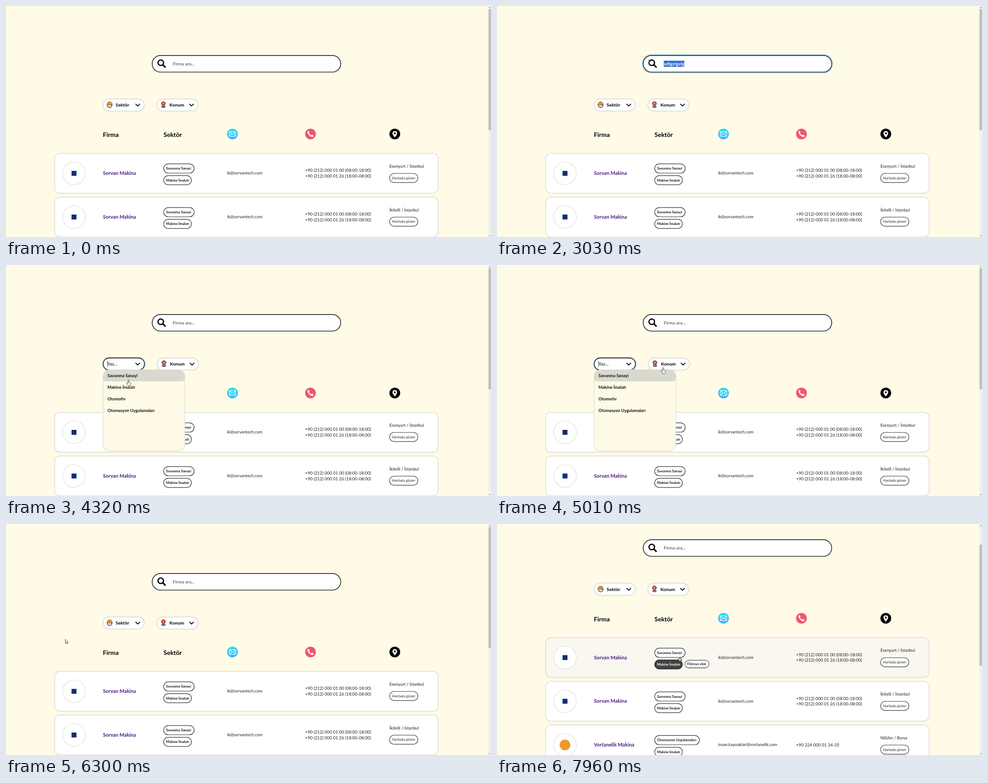
Recreate the animation shown at these times as an HTML page. Size 1084 by 517 pixels, loop 8000 ms.

```html
<!DOCTYPE html>
<html lang="tr">
<head>
<meta charset="utf-8">
<title>Firma listesi</title>
<style>
  html, body { margin: 0; width: 100%; height: 100%; overflow: hidden; background: #fffbe6; }
  svg { display: block; width: 100vw; height: 100vh; font-family: Lato, "Open Sans", sans-serif; }
  .b { font-weight: 700; }
</style>
</head>
<body>
<svg id="stage" viewBox="0 0 1084 517"></svg>
<script>
const LOOP = 8000;
const SCROLL = 75.5;
const stage = document.getElementById('stage');
const $ = id => document.getElementById(id);

// ---- markup helpers ----
const text = (x, y, size, str, extra = '') =>
  `<text x="${x}" y="${y}" font-size="${size}" ${extra}>${str}</text>`;
const bold = (x, y, size, str, extra = '') => text(x, y, size, str, 'class="b" ' + extra);
const box = (x, y, w, h, r, extra) =>
  `<rect x="${x}" y="${y}" width="${w}" height="${h}" rx="${r}" ${extra}/>`;
const chevron = x =>
  `<path d="M${x} 219.6l4.4 4.3 4.4-4.3" fill="none" stroke="#000" stroke-width="2" stroke-linecap="round" stroke-linejoin="round"/>`;

const chip = (y, w, label, id = '') =>
  box(352.4, y, w, 20.6, 10.3, `fill="#fff" stroke="#2b2b2b" stroke-width="1.2" ${id && `id="${id}"`}`) +
  bold(357.8, y + 13, 7.8, label, `fill="#111" ${id && `id="${id}Text"`}`);

const tip = (id, x, y) => `<g id="${id}" opacity="0">
  ${box(x, y + 1.2, 53.5, 17, 8.5, 'fill="#000" opacity=".25"')}
  ${box(x, y, 53.5, 17, 8.5, 'fill="#fff" stroke="#444" stroke-width="1.1"')}
  ${bold(x + 5, y + 11.2, 7.8, 'Filtreye ekle', 'fill="#222"')}</g>`;

function card(i, c) {
  const phones = c.phones.map((p, k) =>
    text(668.6, (c.phones.length > 1 ? 41.7 : 48) + k * 12.4, 9.57, p)).join('');
  return `<g transform="translate(0 ${329.7 + i * 97.75})" fill="#222">
    ${box(108.6, 0, 857.3, 89.4, 12, `id="card${i}" fill="#fff" stroke="#dadad4" stroke-width="1.5"`)}
    <circle cx="152" cy="44.8" r="25.4" fill="#fff" stroke="#e2e2e2" stroke-width="1.4"/>
    ${c.logo}
    ${bold(216.8, 48.4, 11.1, c.name, 'fill="#461a80"')}
    ${chip(23.7, c.w, c.sector, i ? '' : 'chipA')}${chip(49.9, 62, 'Makine İmalatı', i ? '' : 'chipB')}
    ${text(494, 47.7, 9.3, c.mail)}${phones}
    ${text(857, 32.3, 9.3, c.place)}
    ${box(857.4, 45, 63.2, 20.4, 10.2, 'fill="#fff" stroke="#333" stroke-width="1.1"')}
    ${text(862.8, 57.9, 7.7, 'Haritada göster')}</g>`;
}

const blueLogo = '<rect x="146.5" y="39.3" width="11" height="11" fill="#0d2f70"/>';
const sorvan = place => ({
  name: 'Sorvan Makina', logo: blueLogo, w: 68.2, sector: 'Savunma Sanayi', mail: 'ik@sorvantech.com',
  phones: ['+90 (212) 000 01 00 (08:00-18:00)', '+90 (212) 000 01 26 (18:00-08:00)'], place
});
const cards = [
  sorvan('Esenyurt / İstanbul'),
  sorvan('İkitelli / İstanbul'),
  { name: 'Vortanelik Makina', logo: '<circle cx="152" cy="44.8" r="12" fill="#ee9a2e"/>', w: 100,
    sector: 'Otomasyon Uygulamaları', mail: 'insan.kaynaklari@vortanelik.com',
    phones: ['+90 224 000 01 34-35'], place: 'Nilüfer / Bursa' }
];

const helmet = `
  <circle cx="231.5" cy="222.2" r="5" fill="#fff" stroke="#3b3b3b" stroke-width="2.2" stroke-dasharray="2.2 1"/>
  <circle cx="231.5" cy="222.6" r="3.2" fill="#fbe3c4"/>
  <path d="M225.6 221.3v-1.2q.6-5.2 5.9-5.6 5.300.4 5.900 5.600v1.200z" fill="#f6a32b" stroke="#3b3b3b" stroke-width=".9"/>
  <path d="M230.400 214.800h2.200v4h-2.200z" fill="#ffd262" stroke="#3b3b3b" stroke-width=".5"/>`;
const pin = `
  <ellipse cx="351.800" cy="225.600" rx="4.600" ry="1.900" fill="#8b8f96" stroke="#333" stroke-width=".9"/>
  <path d="M351.800 225.300q-4.700-5-4.700-6.900a4.700 4.300 0 0 1 9.400 0q0 1.900-4.700 6.900z" fill="#e9573f" stroke="#3a2a2a" stroke-width=".9"/>
  <circle cx="351.800" cy="218.300" r="1.800" fill="#fff" stroke="#3a2a2a" stroke-width=".8"/>`;

// A filter button with its closed and open looks
const filter = (id, x, icon, label) => `<g id="${id}">
  <g id="${id}Closed">
    ${box(x, 208.500, 92, 27.600, 13.800, 'fill="#000" opacity=".07"')}
    ${box(x, 207.900, 92, 27.400, 13.700, 'fill="#fff" stroke="#d6d6d2" stroke-width="1.5"')}
    ${icon}${bold(x + 28.200, 225.300, 10.300, label)}
  </g>
  <g id="${id}Open">
    ${box(x - 1.200, 206.700, 95.400, 29.800, 14.900, 'fill="none" stroke="#97cdec" stroke-width="1.4"')}
    ${box(x + .4, 208.200, 92.200, 26.800, 13.400, 'fill="#fff" stroke="#000" stroke-width="1.4"')}
    ${bold(x + 10, 225.300, 10, 'Yaz...', 'fill="#444"')}
    <path id="${id}Caret" d="M${x + 10.200} 214.800v13.400" stroke="#000" stroke-width=".8"/>
  </g>${chevron(x + 73.200)}</g>`;

const panel = (id, x, items) => `<g id="${id}Panel">
  <clipPath id="${id}Clip">${box(x, 234.400, 182.600, 182.300, 15, '')}</clipPath>
  ${box(x, 234.400, 182.600, 182.300, 15, 'fill="#fefae6"')}
  <g clip-path="url(#${id}Clip)"><rect id="${id}Hover" x="${x}" width="182.600" height="26.200" rx="10" ry="5" fill="#d9d9cf"/></g>
  ${box(x, 234.400, 182.600, 182.300, 15, 'fill="none" stroke="#dcdcd3" stroke-width="1.300"')}
  ${items.map((s, i) => bold(x + 9.800, 250.700 + i * 26.150, 9.400, s, 'fill="#111"')).join('')}</g>`;

const header = `
  ${bold(216.600, 293.400, 14, 'Firma')}${bold(352, 293.400, 14, 'Sektör')}
  <circle cx="506.200" cy="286.400" r="12" fill="url(#sky)"/>
  <rect x="499" y="281.200" width="14.400" height="10.600" rx="1.500" fill="none" stroke="#fff" stroke-width="1.200"/>
  <path d="M499.500 282l6.700 5.400 6.700-5.400M499.500 291.300l4.900-5M512.900 291.300l-4.900-5" fill="none" stroke="#fff" stroke-width="1.100"/>
  <circle cx="680.500" cy="286.400" r="12" fill="#f0566a"/>
  <path d="M675.300 279.700c-1.800 1.300-2 3-.8 5.400q2.700 5.200 7.700 7.600c2.300 1 4 .7 5-1.100.4-.8.200-1.200-.4-1.700l-2.300-1.700c-.7-.5-1.200-.4-1.700.2l-.9 1q-3.200-1.600-5-4.800l.9-.8c.6-.5.700-1 .3-1.600l-1.500-2.300c-.4-.6-.8-.6-1.300-.2z" fill="#fff"/>
  <circle cx="869" cy="286.400" r="12" fill="#000"/>
  <path fill-rule="evenodd" d="M869 294.200q-5.300-6.400-5.300-9.200a5.300 5.300 0 0 1 10.600 0q0 2.800-5.300 9.200zM869 282.800a2.200 2.200 0 1 0 .01 0z" fill="#fff"/>`;

const search = `
  <rect id="searchRing" x="324.900" y="108.800" width="425.200" height="41" rx="20.500" fill="#eaf6fb" stroke="#8cc9ea" stroke-width="1.500"/>
  ${box(326.700, 110.700, 421.400, 37.200, 18.600, 'fill="#fff" stroke="#000" stroke-width="1.400"')}
  <circle cx="345.900" cy="127" r="6.200" fill="none" stroke="#000" stroke-width="2.800"/>
  <path d="M350.700 131.800l5 4.900" stroke="#000" stroke-width="3.300" stroke-linecap="round"/>
  ${bold(372.700, 132.500, 10, 'Firma ara...', 'id="hint" fill="#6c6c6c"')}
  ${bold(372.700, 132.500, 10.150, '', 'id="typed" fill="#222"')}
  <clipPath id="selClip"><rect id="selArea" y="122.500" height="13.400"/></clipPath>
  <g clip-path="url(#selClip)"><rect x="360" y="122" width="80" height="15" fill="#2f69d2"/>
  ${bold(372.700, 132.500, 10.150, 'sdfgsfgsfg', 'id="word" fill="#fff"')}</g>
  <path id="searchCaret" d="M0 122.500v13.200" stroke="#000" stroke-width=".8"/>`;

const pointers = `
  <circle id="press" r="6.600" fill="#f4e433"/>
  <g id="arrow"><path d="M0 0v9l2.100-1.900 1.500 3.300 1.500-.7-1.500-3.200h2.800z" fill="#fff" stroke="#222" stroke-width=".8"/></g>
  <g id="beam"><path d="M-2-5.200h1.400l.6.500.6-.5h1.400M0-4.800v9.600M-2 5.200h1.400l.6-.5.6.5h1.400" fill="none" stroke="#444" stroke-width=".9"/></g>
  <g id="hand"><path d="M-1 1q0-1.100 1-1.100t1 1.100v4.200l3.400.8q1.200.4 1.100 1.700l-.6 3.400q-.3 2-2.200 2h-2.800q-1 0-1.700-1.100l-2.400-3.600q-.4-1 .5-1.300t2.700 1.400z" fill="#fff" stroke="#222" stroke-width=".8" stroke-linejoin="round"/></g>
  <g id="plus"><path d="M-1.300-4h2.600v2.700h2.700v2.600h-2.700v2.700h-2.600v-2.700h-2.700v-2.600h2.700z" fill="#fff" stroke="#111" stroke-width="1"/></g>`;

stage.innerHTML = `
  <defs><linearGradient id="sky" x2="0" y2="1"><stop stop-color="#1fe3f4"/><stop offset="1" stop-color="#43aefc"/></linearGradient></defs>
  <rect width="1084" height="517" fill="#fffbe6"/>
  <g id="page">
    ${search}${header}${cards.map((c, i) => card(i, c)).join('')}
    ${filter('sector', 216.900, helmet, 'Sektör')}${filter('place', 337.100, pin, 'Konum')}
    ${panel('sector', 217, ['Savunma Sanayi', 'Makine İmalatı', 'Otomotiv', 'Otomasyon Uygulamaları'])}
    ${panel('place', 337.300, ['İstanbul', 'Ankara', 'Ardahan', 'Bursa'])}
    ${tip('tipA', 426, 354.400)}${tip('tipB', 420.200, 380.400)}
  </g>
  <rect x="1078" width="6" height="517" fill="#f1f1f1"/>
  <path d="M1079.300 4.300l1.700-2 1.700 2zM1079.300 513l1.700 2 1.700-2z" fill="#555"/>
  <rect id="thumb" x="1078.400" width="5.600" height="271" fill="#bfbfbf"/>
  ${pointers}`;

// ---- timing ----
const FOCUS = 1535, TYPE = 1650, TYPED = 2020, DRAG = 2400, DRAG_END = 2770, ERASE = 3155;
const SECTOR = 3850, PLACE = 5120, CLOSE = 6295;
const WORD = 'sdfgsfgsfg';
const path = [
  [700, 952, -6], [1470, 464, 118], [2150, 464, 121], [2390, 428, 128], [2750, 340, 125.500],
  [3155, 340, 125.500], [3770, 265, 222], [3910, 265, 222], [4320, 273.500, 257], [4600, 277, 300],
  [4760, 282, 316], [5060, 378, 223], [5180, 378, 223], [5430, 421, 326], [5490, 421, 322],
  [5560, 421, 294], [5720, 392, 258], [6080, 119, 264], [6230, 132.700, 258], [6380, 132.700, 258],
  [7050, 340, 302], [7330, 385, 289], [7480, 385, 289], [7740, 379.500, 316], [7880, 379.500, 316], [7960, 409, 304]
];
const presses = [[1470, 1610], [DRAG, DRAG_END], [3835, 3950], [5105, 5220]];

const within = (v, a, b) => v >= a && v < b;
const ramp = (t, a, b) => {
  const u = Math.min(1, Math.max(0, (t - a) / (b - a)));
  return u * u * (3 - 2 * u);
};
const mix = (a, b, u) => `rgb(${a.map((v, i) => Math.round(v + (b[i] - v) * u))})`;
const show = (id, on) => $(id).setAttribute('visibility', on ? 'visible' : 'hidden');
const set = (id, attrs) => { for (const k in attrs) $(id).setAttribute(k, attrs[k]); };
const blink = (t, start) => (t - start) % 1060 < 530;
const wordX = n => 372.700 + (n ? $('word').getSubStringLength(0, n) : 0);

function pointer(t) {
  let i = path.findIndex(p => p[0] > t);
  if (i === 0) return path[0].slice(1);
  if (i < 0) return path[path.length - 1].slice(1);
  const [t0, x0, y0] = path[i - 1], [t1, x1, y1] = path[i], u = ramp(t, t0, t1);
  return [x0 + (x1 - x0) * u, y0 + (y1 - y0) * u];
}

function pointerKind(t, x, y) {
  if (t > 7130) return 'plus';
  if (t >= CLOSE) return 'arrow';
  if (within(x, 326, 749) && within(y, 110, 148)) return 'beam';
  const inPanel = left => within(x, left, left + 183) && within(y, 235, 417);
  const inButton = left => within(x, left, left + 93) && within(y, 207, 235);
  if (within(t, SECTOR, PLACE) && inPanel(217) || t >= PLACE && inPanel(337)) return 'hand';
  if (inButton(217)) return within(t, SECTOR, PLACE) ? 'beam' : 'hand';
  if (inButton(337)) return t >= PLACE ? 'beam' : 'hand';
  return 'arrow';
}

function drawSearch(t, px) {
  const focused = within(t, FOCUS, SECTOR);
  const count = within(t, TYPE, ERASE) ? Math.min(10, Math.ceil((t - TYPE) / (TYPED - TYPE) * 10)) : 0;
  let from = 10;
  if (within(t, DRAG, ERASE)) while (from > 0 && wordX(from) > px + 2.300) from--;
  const selected = from < 10;
  const start = selected ? wordX(from) : 0;
  show('searchRing', focused);
  show('hint', !count);
  $('typed').textContent = WORD.slice(0, count);
  set('selArea', { x: start, width: selected ? wordX(10) - start : 0 });
  const since = t >= ERASE ? ERASE : t >= TYPED ? TYPED : FOCUS;
  show('searchCaret', focused && !selected && blink(t, since));
  set('searchCaret', { transform: `translate(${wordX(count) + .4} 0)` });
}

function drawFilter(id, t, start, end, left, hoverAt) {
  const open = within(t, start, end);
  show(id + 'Closed', !open);
  show(id + 'Open', open);
  show(id + 'Panel', open);
  show(id + 'Caret', open && blink(t, start));
  const [x, y] = hoverAt, item = Math.floor((y - 234.400) / 26.200);
  show(id + 'Hover', open && within(x, left, left + 183) && within(item, 0, 4));
  set(id + 'Hover', { y: 234.400 + Math.max(0, item) * 26.200 });
}

function drawChip(id, tipId, u) {
  set(id, { fill: mix([255, 255, 255], [66, 66, 66], u) });
  set(id + 'Text', { fill: mix([17, 17, 17], [255, 255, 255], u) });
  set(tipId, { opacity: u });
}

function draw(t) {
  const [x, y] = pointer(t), late = pointer(t - 75);
  const scroll = SCROLL * ramp(t, 6600, 6850);
  set('page', { transform: `translate(0 ${-scroll})` });
  set('thumb', { y: 7 + scroll / SCROLL * 39 });

  drawSearch(t, x);
  drawFilter('sector', t, SECTOR, PLACE, 217, late);
  drawFilter('place', t, PLACE, CLOSE, 337, late);
  set('place', { transform: `translate(${within(t, SECTOR, PLACE) ? 1.200 : 0} 0)` });

  const onCard = t > CLOSE && within(y + scroll, 330, 419);
  set('card0', { fill: onCard ? '#faf7f1' : '#fff' });
  const second = ramp(t, 7490, 7740);
  drawChip('chipA', 'tipA', ramp(t, 7080, 7330) * (1 - second));
  drawChip('chipB', 'tipB', second);

  const visible = t >= 720 && !within(t, TYPE, 2150);
  const kind = pointerKind(t, x, y);
  for (const id of ['arrow', 'beam', 'hand', 'plus']) {
    show(id, visible && id === kind);
    set(id, { transform: `translate(${x} ${y})` });
  }
  show('press', presses.some(([a, b]) => within(t, a, b)));
  set('press', { cx: x - .5, cy: y + .5 });
}

const begin = performance.now();
function tick() {
  draw((performance.now() - begin) % LOOP);
  requestAnimationFrame(tick);
}
tick();
</script>
</body>
</html>
```
